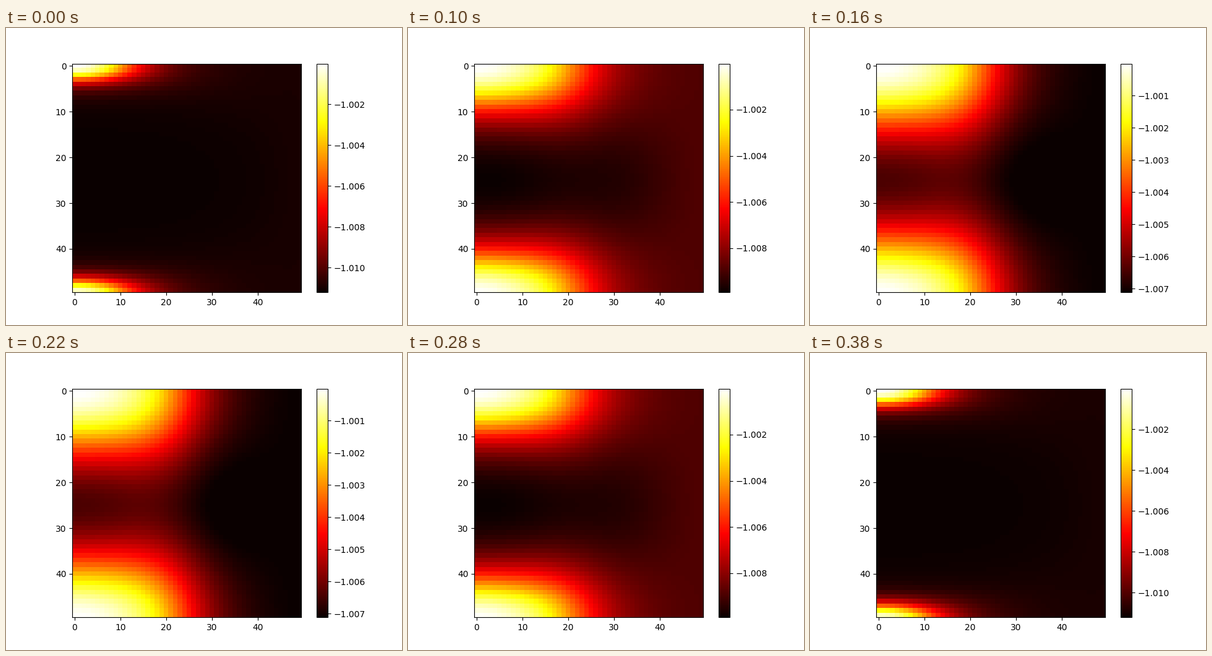
A matplotlib script that plays this animation: 640 by 480 pixels, repeating every 400 ms.

```python
import numpy as np
import matplotlib.pyplot as plt
from matplotlib.animation import FuncAnimation

plt.rcParams["axes.formatter.useoffset"] = False

N = 50
FRAMES = 20
INTERVAL = 20


def phase(k):
    """Goes from 0 to 1 and back over one loop."""
    return np.sin(np.pi * k / (FRAMES - 1)) ** 2


# Peak widths along x and y, as smooth functions of the phase
KEYS = phase(np.array([0, 2, 5, 8]))
WIDTH_X = np.polyfit(KEYS, [0.230, 0.390, 0.802, 1.249], 3)
WIDTH_Y = np.polyfit(KEYS, [0.250, 0.368, 0.750, 1.211], 3)

rows, cols = np.mgrid[0:N, 0:N]
SIN2_X = np.sin(np.pi * cols / (2 * N)) ** 2
COS_X = np.cos(np.pi * cols / (2 * N))
SIN2_Y = np.sin(np.pi * rows / N) ** 2


def field(i):
    k = min(i, FRAMES - 1 - i)
    s = phase(k)
    tx = 1 / np.polyval(WIDTH_X, s)
    ty = 1 / np.polyval(WIDTH_Y, s) ** 2
    steep = 0.45 * np.sqrt(s)
    ramp = SIN2_X - steep * np.sin(2 * np.pi * SIN2_X) / (2 * np.pi)
    t = tx * ramp + ty * SIN2_Y * COS_X ** (1.6 + 0.4 * s)
    t = np.minimum(t, max(tx, ty))
    depth = 0.01136 - 0.00014 * np.exp(-k)
    return -1.00001 - depth * t / np.sqrt(1 + t * t)


fig, ax = plt.subplots(figsize=(6.4, 4.8), dpi=100)
image = ax.imshow(field(0), cmap="hot", interpolation="nearest")
bar = fig.colorbar(image)


def update(i):
    data = field(i)
    image.set_data(data)
    image.set_clim(data.min(), data.max())
    return [image]


anim = FuncAnimation(fig, update, frames=FRAMES, interval=INTERVAL,
                     repeat=True, repeat_delay=0, blit=False)
plt.show()
```
